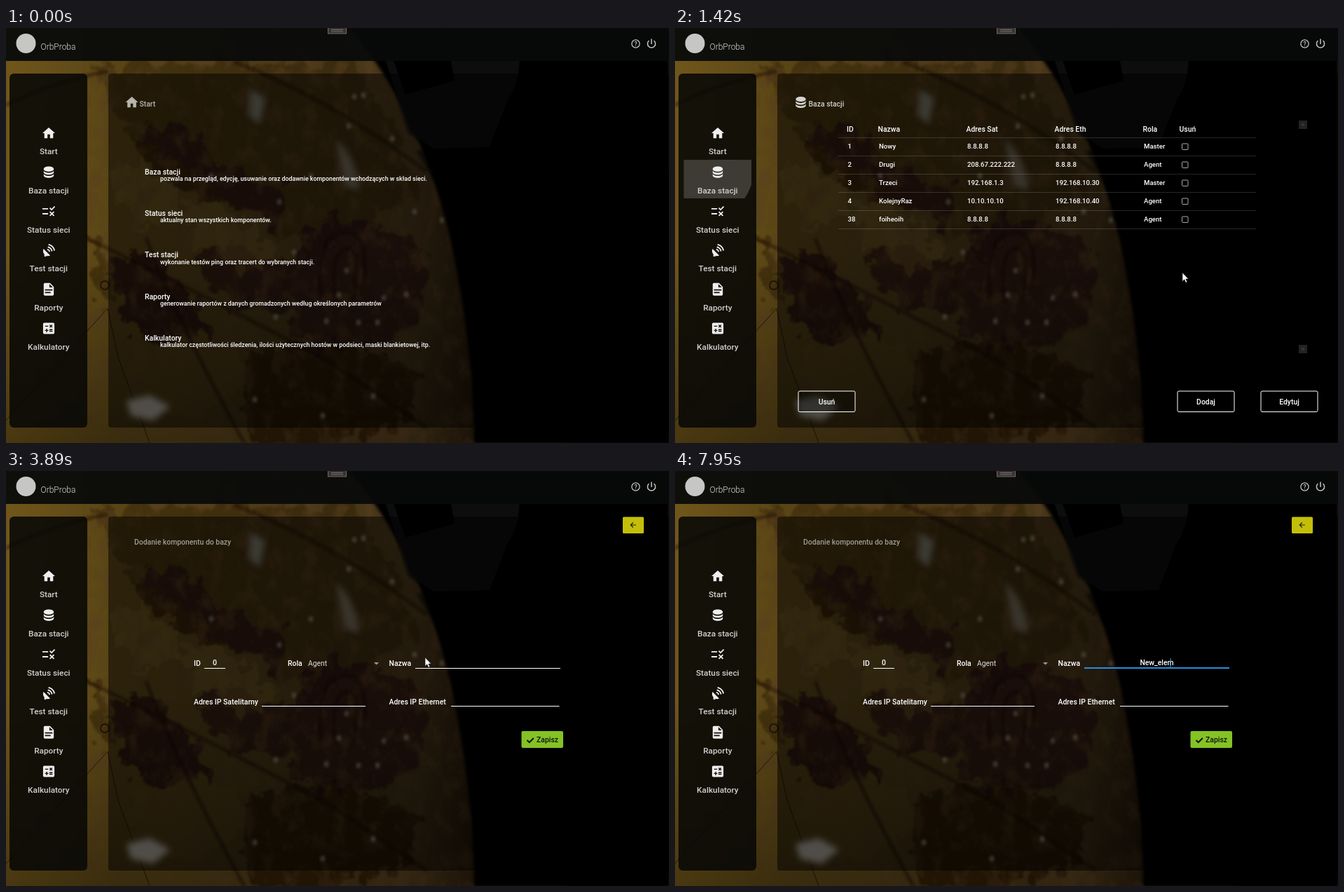
An HTML page that plays this animation: 946x592 px, repeating every 8000 ms.

```html
<!DOCTYPE html>
<html lang="pl">
<head>
<meta charset="utf-8">
<title>OrbProba</title>
<style>
html, body { margin: 0; width: 100%; height: 100%; overflow: hidden; background: #030404; }
svg { position: absolute; left: 0; top: 0; width: 100%; height: 100%; }
#scene { will-change: transform; }
text { font: 500 10.4px Roboto, sans-serif; fill: #fff; }
.menu text { font-size: 11.8px; fill: #d0d0cc; text-anchor: middle; }
.menu path { fill: #eee; }
.note { font-size: 8.8px; }
.cell { font-size: 9.6px; }
.mid { text-anchor: middle; }
.line { stroke: #fff; stroke-width: 1; }
path { fill-rule: evenodd; }
</style>
</head>
<body>
<svg id="scene" viewBox="0 0 946 592">
  <defs>
    <linearGradient id="sea">
      <stop offset="0" stop-color="#70561a"/><stop offset=".16" stop-color="#594516"/>
      <stop offset=".38" stop-color="#4d3b18"/><stop offset=".62" stop-color="#46351a"/>
      <stop offset=".71" stop-color="#2a1c0c"/>
    </linearGradient>
    <linearGradient id="shade" x2="0" y2="1">
      <stop offset=".55" stop-opacity="0"/><stop offset="1" stop-opacity=".35"/>
    </linearGradient>
    <filter id="rough" x="-10%" y="-10%" width="120%" height="120%">
      <feTurbulence type="fractalNoise" baseFrequency=".035" numOctaves="4" seed="7"/>
      <feDisplacementMap in="SourceGraphic" scale="55" xChannelSelector="R" yChannelSelector="G"/>
      <feGaussianBlur stdDeviation="1"/>
    </filter>
    <filter id="grain" x="0" y="0" width="1" height="1">
      <feTurbulence type="fractalNoise" baseFrequency=".045 .035" numOctaves="4" seed="3"/>
      <feColorMatrix values="0 0 0 0 .1  0 0 0 0 .05  0 0 0 0 .015  3.4 0 0 0 -1.55"/>
    </filter>
    <filter id="soft" x="-50%" y="-50%" width="200%" height="200%"><feGaussianBlur stdDeviation="2"/></filter>
    <filter id="haze" x="-50%" y="-50%" width="200%" height="200%"><feGaussianBlur stdDeviation="5"/></filter>
  </defs>
  <rect width="946" height="592" fill="url(#sea)"/>
  <!-- land masses on the globe -->
  <g filter="url(#rough)" fill="#27150a">
    <path opacity=".4" d="M130 50H500L590 230L440 330L330 250L250 200L170 150Z"/>
    <path opacity=".65" d="M185 145L270 140L300 190L400 230L390 290L320 250L250 235L190 190Z"/>
    <path opacity=".8" d="M150 320L230 330L260 390L300 420L250 455L180 430L155 380Z"/>
    <path opacity=".7" d="M270 320L340 310L410 340L400 410L330 400L290 370Z"/>
    <path opacity=".7" d="M420 280L510 270L600 320L590 400L560 450L430 455L390 400Z"/>
    <path opacity=".65" d="M350 460L470 440L590 490L570 560L450 600H370L330 540Z"/>
    <path opacity=".45" d="M120 290L150 340L145 400L120 360Z"/>
  </g>
  <g filter="url(#rough)" fill="#705a26" opacity=".5">
    <path d="M160 195L215 190L250 235L245 270L200 290L165 245Z"/>
    <path d="M240 265L290 245L340 290L390 310L350 345L280 310Z"/>
    <path d="M170 470L240 430L330 450L340 500L270 560L180 540Z" opacity=".45"/>
  </g>
  <rect x="110" width="560" height="592" filter="url(#grain)" opacity=".55"/>
  <g fill="none" stroke="#150c05" stroke-width="3" opacity=".75">
    <path d="M325 48Q470 105 600 205M0 110Q70 75 145 62M116 300Q300 390 460 475L600 570M340 592Q250 430 200 300" filter="url(#soft)"/>
    <path d="M0 560L145 400L160 470L205 592" stroke-width="1"/>
    <circle cx="141" cy="367" r="6" stroke-width="2"/>
    <path d="M450 385Q440 300 480 292T510 370M470 390Q462 320 485 315T495 390" filter="url(#soft)"/>
  </g>
  <rect width="946" height="592" fill="url(#shade)"/>
  <g filter="url(#haze)">
    <path d="M172 532L205 524L234 540L210 560L178 553Z" fill="#a09b92"/>
    <path d="M349 87L370 100L362 138L347 125Z" fill="#777367"/>
    <path d="M470 158Q500 185 504 232L484 225Z" fill="#726958"/>
  </g>
  <g id="pins" fill="#b5ad9a" opacity=".65"></g>
  <path d="M490 0Q600 130 640 330Q668 470 668 592H946V0Z" fill="#030404" filter="url(#soft)"/>
  <!-- dark silhouette beside the globe -->
  <g filter="url(#soft)" fill="#080a0a">
    <path d="M530 12L640 0H725Q745 60 715 105L690 170L610 172L575 150Z"/>
    <path d="M585 175L700 160L800 155L870 200L946 210V592H800L740 400L660 300Z" opacity=".5"/>
    <path d="M548 32L630 22L640 75L570 95Z" fill="#030404"/>
  </g>
  <rect width="946" height="47" fill="#080a0a" opacity=".93"/>
  <rect x="5" y="65" width="111" height="505" rx="6" fill="#080806" opacity=".88"/>
  <path d="M150 65H946V570H150Q146 570 146 566V69Q146 65 150 65Z" opacity=".5"/>
</svg>

<svg id="ui" viewBox="0 0 946 592"></svg>

<script>
const $ = id => document.getElementById(id);
const text = (x, y, s, attrs = '') => `<text x="${x}" y="${y}" ${attrs}>${s}</text>`;
const rect = (x, y, w, h, attrs) => `<rect x="${x}" y="${y}" width="${w}" height="${h}" ${attrs}/>`;
const line = (x1, x2, y) => `<path class="line" d="M${x1} ${y}H${x2}"/>`;
const icon = (x, y, d, fill, k = .9) =>
  `<path d="${d}" transform="translate(${x - 12 * k} ${y - 12 * k}) scale(${k})" ${fill ? `fill="${fill}"` : ''}/>`;

const icons = {
  home: 'M10 20V14H14V20H19V12H22L12 3L2 12H5V20H10Z',
  base: 'M12 3C7.6 3 4 4.8 4 7S7.6 11 12 11S20 9.2 20 7S16.4 3 12 3M4 9V12C4 14.2 7.6 16 12 16S20 14.2 20 12V9C20 11.2 16.4 13 12 13S4 11.2 4 9M4 14V17C4 19.2 7.6 21 12 21S20 19.2 20 17V14C20 16.2 16.4 18 12 18S4 16.2 4 14Z',
  rule: 'M16.5 11L13 7.5L14.4 6L16.5 8.2L20.8 3.9L22.2 5.3ZM11 7H2V9H11ZM21 13.4L19.6 12L17 14.6L14.4 12L13 13.4L15.6 16L13 18.6L14.4 20L17 17.4L19.6 20L21 18.6L18.4 16ZM11 15H2V17H11Z',
  dish: 'M11.9 2L11.3 3.9C15.8 4.8 19.2 8.2 20 12.6L22 12.1C21 7 17 3 11.9 2M10.8 5.9L10.3 7.8C13.3 8.3 15.7 10.6 16.2 13.7L18.1 13.2C17.5 9.4 14.5 6.5 10.8 5.9M3.7 9.7C2.4 12.6 2.9 15.9 5 18.3V22H8V20.4C10 21.2 12.3 21.2 14.3 20.3ZM9.8 9.8L9.3 11.7A3 3 0 0 1 12.3 14.7L14.2 14.2C14 11.9 12.1 10 9.8 9.8Z',
  file: 'M13 9H18.5L13 3.5ZM6 2H14L20 8V20A2 2 0 0 1 18 22H6A2 2 0 0 1 4 20V4A2 2 0 0 1 6 2M15 18V16H6V18ZM18 14V12H6V14Z',
  calc: 'M19 3H5A2 2 0 0 0 3 5V19A2 2 0 0 0 5 21H19A2 2 0 0 0 21 19V5A2 2 0 0 0 19 3M13 7L14.1 6L15.5 7.4L16.9 6L18 7L16.6 8.5L18 9.9L16.9 11L15.5 9.5L14.1 11L13 9.9L14.4 8.5ZM6.2 7.7H11.2V9.2H6.2ZM11.5 16H9.5V18H8V16H6V14.5H8V12.5H9.5V14.5H11.5ZM18 17.2H13V15.7H18ZM18 14.7H13V13.2H18Z'
};
const menu = [['home', 'Start'], ['base', 'Baza stacji'], ['rule', 'Status sieci'],
  ['dish', 'Test stacji'], ['file', 'Raporty'], ['calc', 'Kalkulatory']];
const notes = [
  'pozwala na przegląd, edycję, usuwanie oraz dodawnie komponentów wchodzących w skład sieci.',
  'aktualny stan wszystkich komponentów.',
  'wykonanie testów ping oraz tracert do wybranych stacji.',
  'generowanie raportów z danych gromadzonych według określonych parametrów',
  'kalkulator częstotliwości śledzenia, ilości użytecznych hostów w podsieci, maski blankietowej, itp.'
];
const columns = [245, 289.5, 415.5, 541.5, 667.5, 719.5];
const stations = [
  ['1', 'Nowy', '8.8.8.8', '8.8.8.8', 'Master'],
  ['2', 'Drugi', '208.67.222.222', '8.8.8.8', 'Agent'],
  ['3', 'Trzeci', '192.168.1.3', '192.168.10.30', 'Master'],
  ['4', 'KolejnyRaz', '10.10.10.10', '192.168.10.40', 'Agent'],
  ['38', 'foiheoih', '8.8.8.8', '8.8.8.8', 'Agent']
];

const frame =
  '<circle cx="28.5" cy="22" r="14" fill="#c6c6c4"/>' +
  text(49.5, 30.5, 'OrbProba', 'style="font-size:12px;font-weight:300;fill:#ddd"') +
  rect(459.5, -2, 26, 10, 'fill="#393433" stroke="#6d6867"') +
  '<path d="M464 2.5H481M464 5H481" stroke="#776f6c"/>' +
  '<g fill="none" stroke="#c4c4c4" stroke-width="1.3"><circle cx="898.5" cy="22.5" r="5.6"/>' +
  '<path d="M917.5 18A5.6 5.6 0 1 0 924.5 18M921 15.5V23" stroke-width="1.5"/></g>' +
  text(898.5, 25.6, '?', 'class="mid" style="font-size:8.5px;fill:#c4c4c4"') +
  '<g class="menu">' + menu.map(([key, label], i) =>
    icon(61, 150 + 55.7 * i, icons[key]) + text(60.8, 180.3 + 55.7 * i, label)).join('') + '</g>';

const startPage =
  icon(179.5, 106, icons.home, '#b8b5ae') + text(190.5, 112, 'Start', 'style="fill:#b8b5ae"') +
  notes.map((note, i) => text(198, 208.6 + 59.3 * i, menu[i && i + 0 ? i + 1 : 1][1]) +
    text(220, 218 + 59.3 * i, note, 'class="note"')).join('');

const outlined = (x, label) =>
  rect(x + .5, 518, 81, 29.5, 'rx="2" fill="#000" fill-opacity=".35" stroke="#fff"') +
  text(x + 41, 536.5, label, 'class="mid"');
const basePage =
  icon(179.5, 106, icons.base, '#d5d3ce') + text(190.5, 112, 'Baza stacji', 'style="fill:#d0cec8"') +
  ['ID', 'Nazwa', 'Adres Sat', 'Adres Eth', 'Rola', 'Usuń'].map((s, i) => text(columns[i], 148, s)).join('') +
  '<g opacity=".15">' + [0, 1, 2, 3, 4, 5].map(i => line(233, 829, 156.5 + 26 * i)).join('') + '</g>' +
  stations.map((row, r) => row.map((s, i) =>
    text(columns[i] + 1.5, 171.7 + 26 * r, s, 'class="cell"')).join('') +
    rect(723.5, 165 + 26 * r, 8.5, 8.5, 'rx="1" fill="none" stroke="#aaa"')).join('') +
  [132, 452].map(y => rect(890, y, 12, 12, 'fill="#222323"') +
    rect(894, y + 4, 4, 4, 'fill="#343434"')).join('') +
  outlined(175.5, 'Usuń') + outlined(716.5, 'Dodaj') + outlined(835.5, 'Edytuj');

const formPage =
  text(183, 104.7, 'Dodanie komponentu do bazy', 'style="fill:#a09e96"') +
  rect(880, 65.5, 30, 23.5, 'rx="1.5" fill="#c3bf08"') +
  '<path d="M899 77H891.5M894.8 73.5L891.3 77L894.8 80.5" fill="none" stroke="#222" stroke-width="1.2"/>' +
  text(268, 278.3, 'ID') + text(298, 277, '0', 'class="mid"') + line(283, 313, 281.5) +
  text(402, 278.3, 'Rola') + text(431, 278.3, 'Agent', 'style="font-weight:400;fill:#ddd"') +
  '<path d="M525 273H532L528.5 276.5Z" fill="#999"/>' +
  text(546.5, 278.3, 'Nazwa') + line(584, 791, 281.5) +
  text(268, 332.5, 'Adres IP Satelitarny') + line(365, 513, 335.5) +
  text(546.5, 332.5, 'Adres IP Ethernet') + line(635, 789.5, 335.5) +
  rect(735.5, 371, 59.5, 24, 'rx="2" fill="#84c225"') +
  '<path d="M743.5 384L746.8 387.2L752.8 381" fill="none" stroke="#111" stroke-width="2"/>' +
  text(757, 387, 'Zapisz', 'style="fill:#111"') +
  '<path id="focus" stroke="#2b8ed8" stroke-width="2"/>' +
  text(687.5, 277, '', 'id="typed" class="mid"') +
  '<path id="caret" stroke="#4aa3df"/>';

$('ui').innerHTML =
  '<clipPath id="menuClip"><rect x="12.5" y="188" width="96.5" height="55"/></clipPath>' +
  '<clipPath id="addClip"><rect x="718" y="519" width="79" height="28"/></clipPath>' +
  '<g clip-path="url(#menuClip)"><circle id="menuRipple" cx="46.5" cy="205" fill="#fff"/></g>' + frame +
  `<g id="start">${startPage}</g><g id="base">${basePage}` +
  '<g clip-path="url(#addClip)"><circle id="addRipple" cx="778" cy="530" fill="#fff"/></g></g>' +
  `<g id="form">${formPage}</g>` +
  '<g id="cursor"><path id="arrow" d="M0 0V12.5L2.8 9.8L4.8 14.2L6.8 13.3L4.9 9.1H8.6Z" fill="#fff" stroke="#111" stroke-width=".6"/>' +
  '<path id="hand" d="M-1.2 1Q0 -1 1.2 1V5.3L5.5 6.6Q7.3 7.3 6.8 9.5L5.6 14H-1L-4.2 9.3Q-4.5 7.5 -2.8 7.8L-1.2 9.4Z" fill="#fff" stroke="#111" stroke-width=".7"/>' +
  '<path id="beam" d="M-3 -6.5H-1L0 -5.5L1 -6.5H3M0 -5.5V5.5M-3 6.5H-1L0 5.5L1 6.5H3" fill="none" stroke="#ddd"/></g>';

const pins = [[497, 98], [510, 96], [551, 158], [489, 140], [435, 211], [293, 211], [390, 248], [622, 274],
  [583, 262], [411, 320], [486, 346], [385, 412], [457, 418], [503, 420], [530, 420], [571, 380],
  [475, 381], [539, 385], [524, 525], [452, 553], [355, 530]];
$('pins').innerHTML = pins.map(([x, y]) => `<ellipse cx="${x}" cy="${y}" rx="3" ry="4" filter="url(#soft)"/>`).join('');

// time, x, y and, where it changes, the pointer shape
const route = [
  [130, 725, 456, 'arrow'], [250, 690, 440], [450, 430, 330], [620, 160, 235], [700, 100, 215, 'hand'],
  [830, 40, 207], [920, 46.5, 205], [1220, 46.5, 205], [1245, 110, 218, 'arrow'], [1420, 724, 349],
  [1490, 724, 349], [1760, 752, 505], [1830, 756, 518, 'hand'], [2100, 778, 530], [2440, 781, 531],
  [2590, 781, 531, 'arrow'], [2730, 781, 531], [3000, 700, 400], [3280, 606, 279, 'beam'], [3350, 601, 272],
  [3420, 600, 271.5], [3889, 600, 271.5], [3890, 598, 266, 'arrow'], [4159, 598, 266],
  [4160, 592, 264, 'beam'], [4370, 630, 279], [4720, 630, 281], [5060, 630, 279.5], [5920, 630, 279.5]
];
const typing = [[0, ''], [5920, 'N'], [6600, 'New'], [7350, 'New_'],
  [7620, 'New_e'], [7730, 'New_el'], [7840, 'New_ele'], [7950, 'New_elem']];

const show = (id, on) => $(id).style.display = on ? '' : 'none';
const ramp = (t, a, b) => Math.min(1, Math.max(0, (t - a) / (b - a)));
const within = (t, a, b) => t >= a && t < b;

function ripple(id, t, begin, fade, end, reach) {
  const grown = ramp(t, begin, begin + 350);
  $(id).setAttribute('r', reach * grown);
  $(id).setAttribute('opacity', t < begin ? 0 : (.28 - .1 * grown) * (1 - ramp(t, fade, end)));
}

function moveCursor(t) {
  const on = within(t, 130, 5920);
  show('cursor', on);
  if (!on) return;
  const next = route.findIndex(key => key[0] > t);
  const [t0, x0, y0] = route[next - 1], [t1, x1, y1] = route[next];
  const k = ramp(t, t0, t1);
  const shape = route.slice(0, next).filter(key => key[3]).pop()[3];
  $('cursor').setAttribute('transform', `translate(${x0 + (x1 - x0) * k} ${y0 + (y1 - y0) * k})`);
  for (const id of ['arrow', 'hand', 'beam']) show(id, id === shape);
}

function typeName(t) {
  const past = typing.filter(([at]) => at <= t).map(([, s]) => s);
  const field = $('typed');
  // the caret trails one letter behind during fast typing
  field.textContent = t >= 7620 ? past[past.length - 2] : past[past.length - 1];
  const end = 687.5 + (field.textContent ? field.getComputedTextLength() / 2 : 0);
  field.textContent = past[past.length - 1];
  $('caret').setAttribute('d', `M${end} 267V280`);
  show('caret', within(t, 4720, 5320) || within(t, 5780, 6950) || t >= 7350);
  const half = 103.5 * ramp(t, 4720, 5060);
  $('focus').setAttribute('d', `M${687.5 - half} 281H${687.5 + half}`);
  show('focus', half > 0);
}

function draw(now) {
  const t = now % 8000;
  show('start', t < 1080);
  show('base', within(t, 1080, 2590));
  show('form', t >= 2590);
  ripple('menuRipple', t, 1010, 1490, 1760, 65);
  ripple('addRipple', t, 2100, 2300, 2440, 80);
  moveCursor(t);
  if (t >= 2590) typeName(t);
  requestAnimationFrame(draw);
}
requestAnimationFrame(draw);
</script>
</body>
</html>
```
